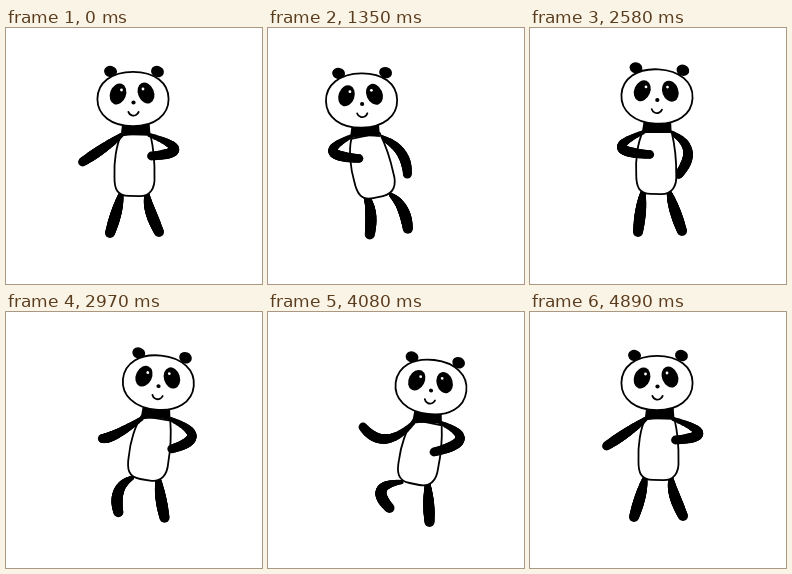
An HTML page with a canvas that plays this animation: 256 by 256 pixels, repeating every 4.92 s.

```html
<!DOCTYPE html>
<html lang="en">
<head>
<meta charset="utf-8">
<title>Dancing panda</title>
<style>
  html, body { margin: 0; width: 100%; height: 100%; overflow: hidden; background: #fff; }
  canvas { display: block; width: 100vw; height: 100vh; }
</style>
</head>
<body>
<canvas id="stage"></canvas>
<script>
const STAGE = 256, LOOP = 4920, STEP = 30, END = LOOP - STEP;
const canvas = document.getElementById('stage');
const ctx = canvas.getContext('2d');

// Each key: time, then values. Tracks are periodic over END.
// head: x, y, tilt in degrees
const head = [
  [0, 127, 71, 0], [150, 119, 69, -1], [540, 96, 73, 0], [720, 99, 73.5, 0],
  [1020, 97, 73, 0], [1320, 93.5, 72.5, -1], [1650, 97, 73, 0], [1980, 98.5, 74.5, -1],
  [2160, 105, 73, 0], [2580, 127, 68.5, 3], [2730, 138, 68, 4], [3000, 154, 71, 6],
  [3240, 165.5, 74, 8], [3390, 173, 75, 9], [3560, 174, 73.5, 9], [3810, 170, 73, 8],
  [4080, 163, 75, 7], [4350, 154, 74, 4], [4650, 139, 71, 2]
];
// bottom of the body: x, y
const base = [
  [0, 128, 168], [360, 116, 168], [720, 109, 169], [1320, 110, 169], [1980, 112, 171],
  [2580, 126, 166], [3000, 140, 168], [3390, 149, 170], [4080, 146.5, 172], [4500, 139, 170]
];
// limbs: joint x, y and tip x, y, measured from shoulder or hip
const leftArm = [
  [0, -18, 13, -39, 27], [220, -19, 18, -22, 36], [450, -21, 15, 3, 23],
  [720, -20, 15, 5, 22], [1350, -18, 15, 8, 22], [1980, -14, 15, 12, 20],
  [2580, -21, 15, 7, 22], [2820, -22, 19, -20, 32], [3060, -26, 13, -47, 12],
  [3390, -31, 14, -47, -1], [3720, -24, 17, -38, 28], [4080, -27, 16, -50, 4],
  [4350, -24, 17, -42, 25], [4650, -25, 12, -51, 16]
];
const rightArm = [
  [0, 25, 14, 2, 21], [280, 24, 18, 18, 32], [500, 26, 10, 46, 20],
  [720, 22, 14, 33, 38], [1020, 28, 6, 52, 3], [1330, 21, 15, 28, 38],
  [1640, 28, 6, 53, 4], [1980, 9, 10, -4, 20], [2280, 20, 16, 30, 34],
  [2580, 17, 18, 8, 42], [2760, 25, 15, 26, 24], [3000, 22, 17, 0, 31],
  [3390, 19, 17, -7, 35], [3720, 21, 16, -3, 27], [4080, 19, 16, -7, 29],
  [4450, 24, 16, 0, 26]
];
const leftLeg = [
  [0, -4, 16, -11, 39], [360, 1, 16, -2, 40], [720, 4, 16, 4, 40], [1980, 5, 16, 3, 39],
  [2580, -2, 16, -5, 40], [3000, -14, 13, -14, 34], [3390, -21, 13, -10, 28],
  [3740, -6, 16, -18, 37], [4080, -20, 8, -12, 26], [4450, -8, 15, -18, 37]
];
const rightLeg = [
  [0, 3, 16, 12, 38], [420, 17, 11, 16, 31], [720, 6, 16, 18, 38],
  [1020, 21, 10, 13, 28], [1260, 7, 16, 18, 37], [1500, 21, 9, 14, 27],
  [1740, 8, 16, 19, 37], [1980, 24, 8, 18, 27], [2260, 8, 16, 18, 37],
  [2580, 5, 16, 13, 39], [3000, 2, 17, 6, 40], [3390, 1, 18, 2, 41],
  [4080, 1, 18, 2, 40], [4500, 2, 17, 7, 39]
];

// Smooth periodic interpolation through the keys.
function sample(track, t) {
  const n = track.length;
  const key = i => track[(i + n) % n];
  const time = i => key(i)[0] + Math.floor(i / n) * END;
  let i = n - 1;
  while (track[i][0] > t) i--;
  const span = time(i + 1) - time(i);
  const u = (t - time(i)) / span, v = 1 - u;
  const slope = (j, c) => (key(j + 1)[c] - key(j - 1)[c]) / (time(j + 1) - time(j - 1)) * span;
  return key(i).slice(1).map((a, k) => {
    const c = k + 1, b = key(i + 1)[c];
    return v * v * (1 + 2 * u) * a + u * u * (3 - 2 * u) * b
      + u * v * v * slope(i, c) - u * u * v * slope(i + 1, c);
  });
}

function oval(x, y, rx, ry, turn = 0) {
  ctx.beginPath();
  ctx.ellipse(x, y, rx, ry, turn, 0, 2 * Math.PI);
  ctx.fill();
}

// A tapered limb, thin at the root, curving through its joint.
function limb(x, y, [jx, jy, tx, ty], root, tip) {
  const cx = 2 * jx - tx / 2, cy = 2 * jy - ty / 2;
  for (let i = 0; i <= 48; i++) {
    const u = i / 48, w = 2 * u * (1 - u);
    const r = root + (tip - root) * Math.sin(Math.min(1, u * 1.35) * Math.PI / 2)
      - Math.max(0, u - 0.8) * 3;
    oval(x + w * cx + u * u * tx, y + w * cy + u * u * ty, r, r);
  }
}

function outline() {
  ctx.fillStyle = '#fff';
  ctx.fill();
  ctx.stroke();
  ctx.fillStyle = '#000';
}

function drawBody(x, y, bx, by) {
  const len = Math.hypot(bx - x, by - y);
  ctx.save();
  ctx.translate(x, y);
  ctx.rotate(Math.atan2(x - bx, by - y));
  ctx.beginPath();
  ctx.moveTo(-14, 0);
  ctx.bezierCurveTo(-19, 11, -21, 28, -20, 42);
  ctx.bezierCurveTo(-20, 55, -17, len, -5, len);
  ctx.lineTo(5, len);
  ctx.bezierCurveTo(16, len, 21, len - 8, 20, len - 20);
  ctx.bezierCurveTo(20, 30, 18, 12, 15, 0);
  ctx.closePath();
  outline();
  ctx.restore();
}

function drawNeck(x, y, turn) {
  ctx.save();
  ctx.translate(x, y);
  ctx.rotate(turn);
  ctx.beginPath();
  ctx.moveTo(-13, -13);
  ctx.lineTo(14, -13);
  ctx.lineTo(15, 1);
  ctx.quadraticCurveTo(0, -1, -15, 2);
  ctx.fill();
  ctx.restore();
}

function drawHead(x, y, turn) {
  const rx = 35.6, ry = 27.2, k = 0.6;
  ctx.save();
  ctx.translate(x, y);
  ctx.rotate(turn);
  oval(-22.5, -27.5, 6.5, 5.6, 0.2);
  oval(24.5, -27.5, 6.5, 5.6, 0.3);
  ctx.beginPath();
  ctx.moveTo(-rx, 0);
  ctx.bezierCurveTo(-rx, -ry * k, -rx * k, -ry, 0, -ry);
  ctx.bezierCurveTo(rx * k, -ry, rx, -ry * k, rx, 0);
  ctx.bezierCurveTo(rx, ry * k, rx * k, ry, 0, ry);
  ctx.bezierCurveTo(-rx * k, ry, -rx, ry * k, -rx, 0);
  outline();
  oval(-15, -5, 8, 10.8, 0.35);
  oval(13, -6, 8, 10.8, -0.4);
  oval(0.5, 3.5, 2.1, 1.9);
  ctx.fillStyle = '#fff';
  oval(-11.5, -9, 1.4, 1.4);
  oval(10, -10, 1.4, 1.4);
  ctx.fillStyle = '#000';
  ctx.beginPath();
  ctx.arc(0.5, 11.2, 5.4, 0.1 * Math.PI, 0.9 * Math.PI);
  ctx.stroke();
  ctx.restore();
}

function drawPanda(t) {
  const [hx, hy, tilt] = sample(head, t);
  const [bx, by] = sample(base, t);
  const x = hx + 2.5 - 0.93 * tilt, y = hy + 35.5;
  const turn = tilt * Math.PI / 180;
  const armBehind = t > 400 && t < 2650;
  const right = () => limb(x + 14, y + 0.5, sample(rightArm, t), 2.2, 5);

  limb(bx - 13, by - 2, sample(leftLeg, t), 2.2, 5.6);
  limb(bx + 13, by - 2, sample(rightLeg, t), 2.2, 5.6);
  if (armBehind) right();
  drawBody(x, y, bx, by);
  drawNeck(x, y, turn * 0.4);
  if (!armBehind) right();
  limb(x - 14, y + 0.5, sample(leftArm, t), 2.2, 5);
  drawHead(hx, hy, turn);
}

function frame(now) {
  const ratio = window.devicePixelRatio || 1;
  const w = Math.round(innerWidth * ratio), h = Math.round(innerHeight * ratio);
  if (canvas.width !== w || canvas.height !== h) {
    canvas.width = w;
    canvas.height = h;
  }
  ctx.setTransform(w / STAGE, 0, 0, h / STAGE, 0, 0);
  ctx.fillStyle = '#fff';
  ctx.fillRect(0, 0, STAGE, STAGE);
  ctx.fillStyle = ctx.strokeStyle = '#000';
  ctx.lineWidth = 1.8;
  ctx.lineCap = ctx.lineJoin = 'round';
  const t = Math.floor((now % LOOP) / STEP) * STEP;
  drawPanda(t % END);
  requestAnimationFrame(frame);
}
requestAnimationFrame(frame);
</script>
</body>
</html>
```
